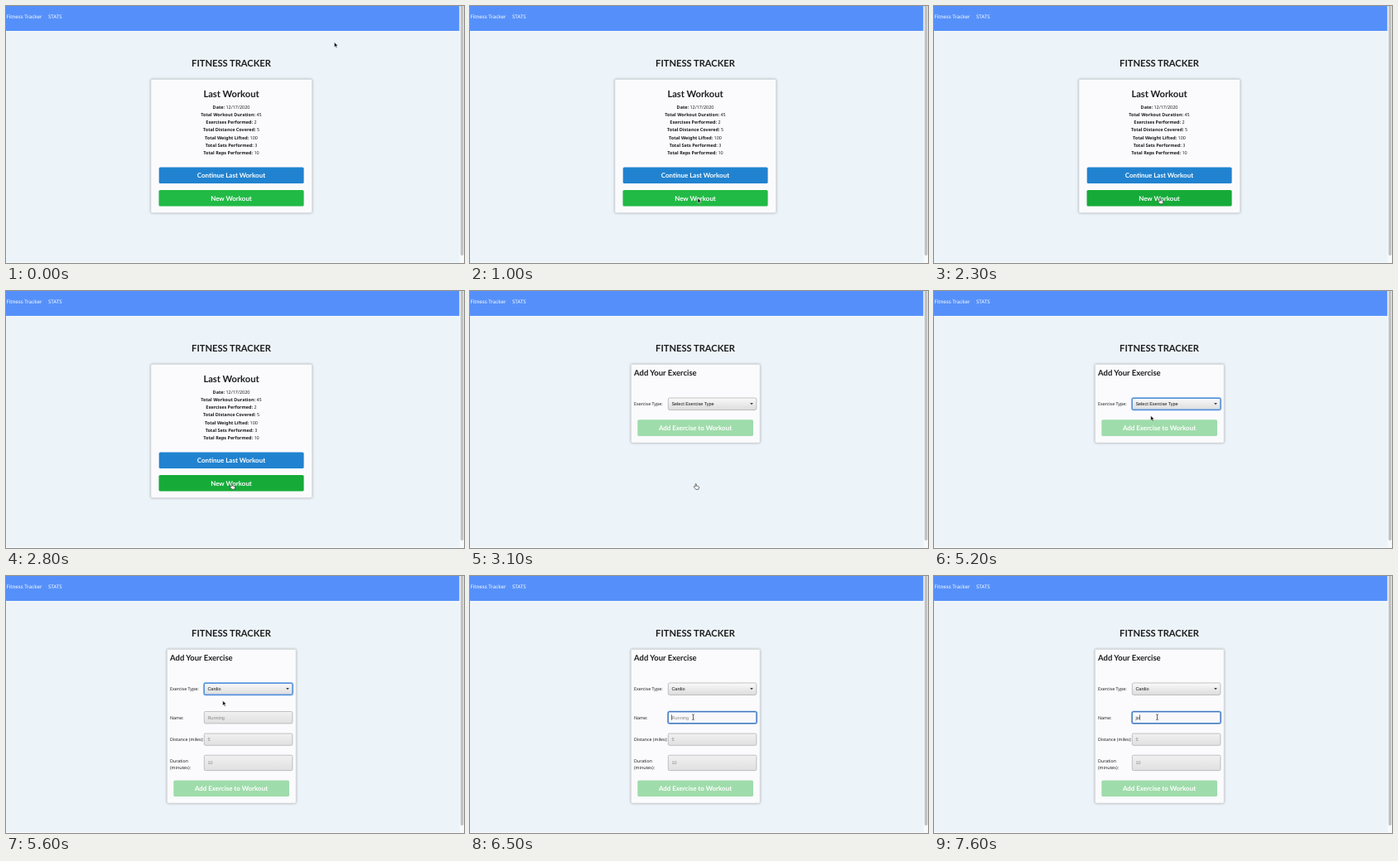
An HTML page that plays this animation: 553x310 px, repeating every 8 s.

```html
<!DOCTYPE html>
<html lang="en">
<head>
<meta charset="utf-8">
<title>Fitness Tracker</title>
<style>
html, body { margin: 0; width: 100%; height: 100%; overflow: hidden; background: #edf4f9; }
svg { display: block; width: 100%; height: 100%; }
text { font-family: "Noto Sans", sans-serif; font-size: 5.3px; fill: #1b1c1d; text-rendering: geometricPrecision; white-space: pre; }
.nav { font-size: 6.15px; fill: #fff; }
.head { font: 700 11.15px Lato, sans-serif; text-anchor: middle; }
.sub { font: 700 9.5px Lato, sans-serif; }
.btn { font: 700 7.95px Lato, sans-serif; fill: #fff; text-anchor: middle; }
.stat { font-size: 5.45px; text-anchor: middle; }
.field { font: 5.5px "Liberation Sans", Arial, sans-serif; fill: #111; }
.hint { fill: #858585; }
.card { fill: #fbfbfd; stroke: #d0d4d8; stroke-width: .5; filter: drop-shadow(0 .5px 1.4px rgba(0, 0, 0, .32)); }
.box { stroke: #ababab; stroke-width: .7; }
.ring { fill: none; }
</style>
</head>
<body>
<svg id="stage" viewBox="0 0 553 310" preserveAspectRatio="none">
  <defs>
    <linearGradient id="selectFill" x2="0" y2="1"><stop stop-color="#fafafa"/><stop offset="1" stop-color="#dcdcdc"/></linearGradient>
    <linearGradient id="inputFill" x2="0" y2="1"><stop stop-color="#f1f1f2"/><stop offset="1" stop-color="#e0e0e1"/></linearGradient>
  </defs>
</svg>
<script>
const LOOP = 8000, STEP = 100, MID = 272;
const stage = document.getElementById("stage");
const $ = id => document.getElementById(id);

const text = (x, y, cls, body, extra = "") =>
  `<text x="${x}" y="${y}" class="${cls}" ${extra}>${body}</text>`;
const rect = (x, y, w, h, r, attrs) =>
  `<rect x="${x}" y="${y}" width="${w}" height="${h}" rx="${r}" ${attrs}/>`;
const button = (x, y, w, fill, label, id = "") =>
  rect(x, y, w, 19.7, 1.7, `fill="${fill}" ${id && `id="${id}"`}`) +
  text(MID, y + 12.7, "btn", label);
const input = (y, h, hint, id = "") =>
  rect(239.3, y, 106.6, h, 1.3, 'class="box" fill="url(#inputFill)"') +
  text(243.4, y + h / 2 + 1.8, "field hint", hint, id && `id="${id}"`);
const ring = (id, y, h, color, glow) =>
  `<g id="${id}" class="ring">` +
  rect(238.9, y, 107.4, h, 2, `stroke="${glow}" stroke-width="2" opacity=".65"`) +
  rect(239.2, y + .3, 106.8, h - .6, 1.6, `stroke="${color}" stroke-width="1"`) + "</g>";

const stats = [["Date", "12/17/2020"], ["Total Workout Duration", 45], ["Exercises Performed", 2],
  ["Total Distance Covered", 5], ["Total Weight Lifted", 100], ["Total Sets Performed", 3],
  ["Total Reps Performed", 10]];

const page =
  rect(0, 0, 553, 310, 0, 'fill="#edf4f9"') +
  rect(0, 0, 547.6, 30, 0, 'fill="#5590fa"') +
  rect(0, 309.2, 553, .8, 0, 'fill="#fafcfd"') +
  rect(547.6, 0, 5.4, 310, 0, 'fill="#f8f9fa"') +
  rect(548.8, -3, 3.6, 304, 1.8, 'fill="#c1c2c4"') +
  text(.5, 15.4, "nav", "Fitness Tracker") + text(51, 15.4, "nav", "STATS") +
  text(MID, 72.6, "head", "FITNESS TRACKER");

const summary = '<g id="summary">' +
  rect(175, 88.4, 194.5, 161, 1.6, 'class="card"') +
  text(MID, 109.5, "head", "Last Workout") +
  stats.map(([name, value], i) => text(MID, 123.5 + i * 9.33, "stat",
    `<tspan font-weight="700">${name}:</tspan> ${value}`)).join("") +
  button(184.7, 194.4, 174.9, "#2183d0", "Continue Last Workout") +
  button(184.5, 221.9, 175.1, "#21ba45", "New Workout", "newBtn") + "</g>";

const form = '<g id="form">' +
  rect(194.5, 88.4, 155.6, 94.6, 1.4, 'class="card" id="formCard"') +
  text(198, 101.6, "sub", "Add Your Exercise") +
  text(198, 138.4, "", "Exercise Type:") +
  rect(239.3, 129, 106.6, 14.5, 2, 'class="box" fill="url(#selectFill)"') +
  text(243.4, 138.1, "field", "", 'id="choice"') +
  '<path d="M338.1 135h3.8l-1.9 2.3z" fill="#2d4460"/>' +
  ring("selectRing", 129, 14.5, "#3f82d8", "#7db2f2") +
  '<g id="fields">' +
  text(198, 172.6, "", "Name:") + input(163.5, 14.4, "Running", "nameHint") +
  '<g id="nameEdit">' +
  rect(239.3, 163.5, 106.6, 14.4, 1, 'fill="#f8f8fa"') +
  ring("nameRing", 163.4, 14.6, "#2a68b8", "#7aa9e2") +
  text(243.6, 172.5, "field hint", "", 'id="typed"') +
  rect(243.4, 167.4, .6, 6.3, 0, 'fill="#111" id="caret"') + "</g>" +
  text(198, 199.2, "", "Distance (miles):") + input(190, 14.3, "5") +
  text(198, 225.3, "", "Duration") + text(198, 233, "", "(minutes):") + input(216.2, 18.4, "10") +
  "</g>" +
  `<g id="addBtn">${button(202.3, 155.3, 139.7, "#9fdcab", "Add Exercise to Workout")}</g></g>`;

const cursors =
  '<g id="arrow"><path d="M0 0v5.9l1.4-1.3 1 2.2 1-.4-1-2.2h1.9z" fill="#0a0a0a" stroke="#fff" stroke-width=".45" stroke-linejoin="round"/></g>' +
  '<g id="hand"><path d="M-1.1 .4V-2.6q0-.7.6-.7t.6.7v2q1.1-.3 1.3.2 1-.2 1.2.4.8 0 .8.9 0 1.5-.8 2.6H-.6Q-1.5 2.2-2.9.6q0-.9.8-.8.5.1 1 .6z" fill="#fff" stroke="#1a1a1a" stroke-width=".6" stroke-linejoin="round"/></g>' +
  '<g id="beam"><path d="M-1.4-3.3q1.1 0 1.4.6.3-.6 1.4-.6M0-2.7V2.7M-1.4 3.3q1.1 0 1.4-.6.3.6 1.4.6" fill="none" stroke="#222" stroke-width=".7"/></g>';

stage.insertAdjacentHTML("beforeend", page + summary + form + cursors);

// time, x, y of the pointer; each leg is eased
const path = [[0, 396.4, 43.8], [1000, 274.9, 231.8], [1200, 274.9, 231.8], [1700, 273, 232.4],
  [2000, 273.4, 235.2], [3200, 273.2, 235.8], [4000, 256.8, 138], [4300, 256.8, 138],
  [5200, 261.7, 150.4], [5600, 261.7, 150.4], [6300, 269.5, 170.2], [LOOP, 269.5, 170.2]];
const ease = p => p * p * (3 - 2 * p);
const mix = (a, b, p) => a + (b - a) * p;
const show = (id, on) => $(id).setAttribute("display", on ? "inline" : "none");

function pointer(t) {
  const i = path.findIndex(k => k[0] > t);
  const [t0, x0, y0] = path[i - 1], [t1, x1, y1] = path[i];
  const p = ease((t - t0) / (t1 - t0));
  return [mix(x0, x1, p), mix(y0, y1, p)];
}

function pointerKind(t, y) {
  if (t >= 2000 && t < 3400) return "hand";
  return t > 5600 && y > 163 ? "beam" : "arrow";
}

function render(time) {
  const t = Math.floor(time % LOOP / STEP) * STEP;
  const onForm = t >= 3100, cardio = t >= 5300, editing = t >= 6500;

  show("summary", !onForm);
  show("form", onForm);
  $("newBtn").setAttribute("fill", t >= 2000 ? "#16ab39" : "#21ba45");

  show("fields", cardio);
  show("selectRing", t >= 4200 && !editing);
  $("choice").textContent = cardio ? "Cardio" : "Select Exercise Type";
  $("formCard").setAttribute("height", cardio ? 185.6 : 94.6);
  $("addBtn").setAttribute("transform", `translate(0 ${cardio ? 91.1 : 0})`);

  const typed = t >= 7300 ? "jo" : t >= 7000 ? "j" : "";
  show("nameEdit", editing);
  $("typed").textContent = typed || "Running";
  $("typed").setAttribute("class", typed ? "field" : "field hint");
  $("caret").setAttribute("x", [243.4, 245.1, 248.1][typed.length]);

  const [x, y] = pointer(t), kind = pointerKind(t, y);
  for (const id of ["arrow", "hand", "beam"]) show(id, id === kind);
  $(kind).setAttribute("transform", `translate(${x} ${y})`);
}

const start = performance.now();
function tick() {
  render(performance.now() - start);
  requestAnimationFrame(tick);
}
tick();
</script>
</body>
</html>
```
